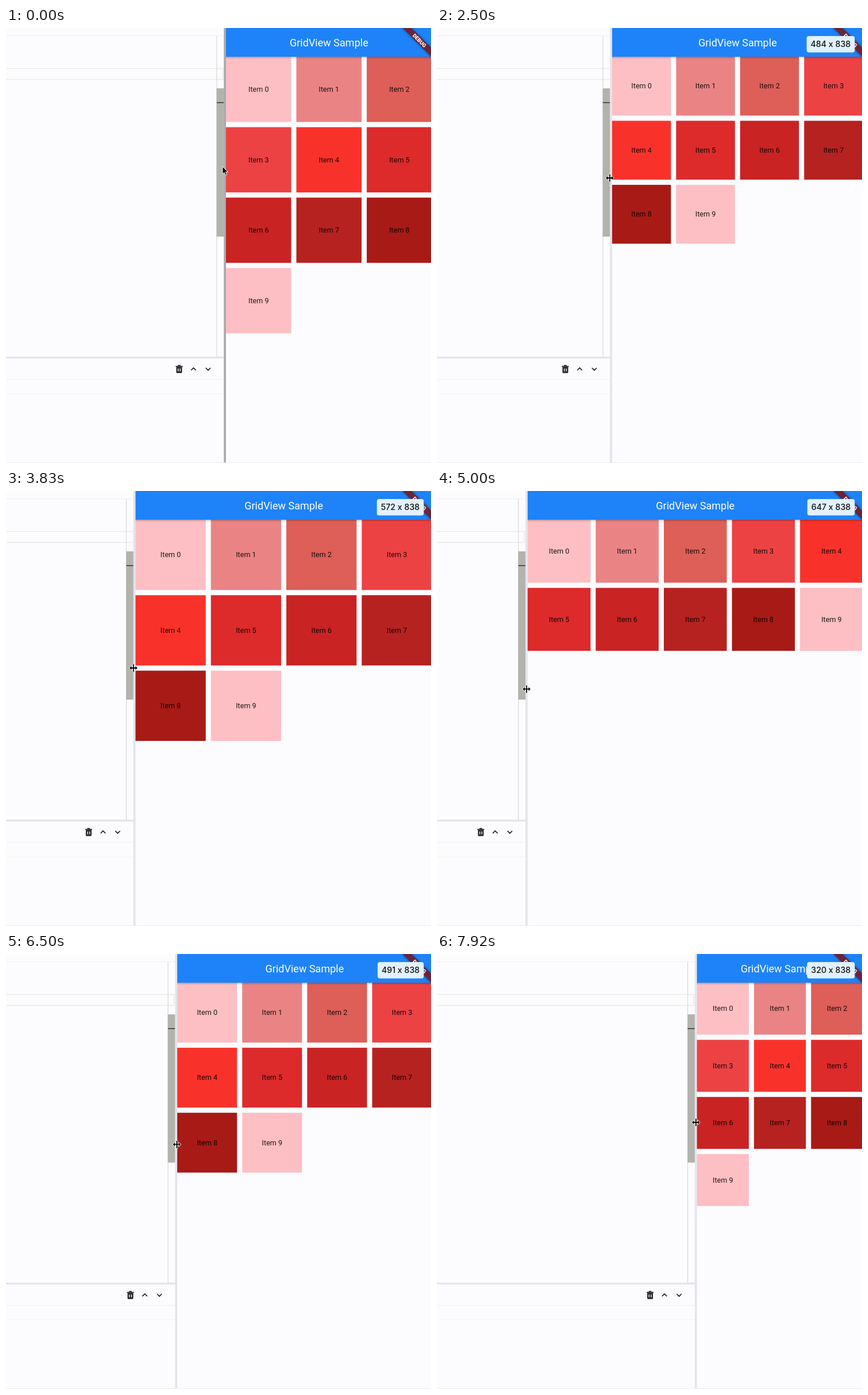
Animation, 740 px wide and 757 px high, one loop 8000 ms. Source, as an HTML page:

```html
<!DOCTYPE html>
<html lang="en">
<head>
<meta charset="utf-8">
<title>Responsive grid</title>
<style>
  html, body { margin: 0; width: 100%; height: 100%; overflow: hidden; background: #fcfcff; }
  svg { display: block; width: 740px; height: 757px; }
  text { font-family: Roboto, sans-serif; text-anchor: middle; }
  .title { font-size: 18.04px; fill: #fff; }
  .item { font-size: 12.63px; fill: #000; fill-opacity: .87; }
  .debug { font-size: 9.2px; font-weight: 900; fill: #fff; }
  .size { font: 500 14.2px Inter, sans-serif; text-anchor: end; fill: #111; }
  .icon { fill: none; stroke: #23272c; stroke-width: 1.7; }
</style>
</head>
<body>
<svg viewBox="0 0 740 757">
  <defs>
    <linearGradient id="shade" x2="0" y2="1">
      <stop stop-color="#000" stop-opacity=".22"/>
      <stop offset="1" stop-color="#000" stop-opacity="0"/>
    </linearGradient>
    <filter id="blur" x="-20%" y="-100%" width="140%" height="300%"><feGaussianBlur stdDeviation="2"/></filter>
  </defs>
  <rect width="740" height="757" fill="#fcfcff"/>
  <rect y="756" width="740" height="1" fill="#ececf1"/>

  <!-- editor side, x = 0 at the panel edge -->
  <g id="editor">
    <path d="M-740 13.5H-4M-740 611.5H-4" stroke="#efeff2"/>
    <path d="M-740 636.5H-4" stroke="#f5f4ea"/>
    <path d="M-740 70.5H-4M-740 89.5H-4" stroke="#e9e9e3" stroke-width="1.4"/>
    <path id="boxEnd" d="M-5.5 70V90" stroke="#e9e9e3" stroke-width="1.4"/>
    <rect x="-740" y="572" width="737" height="3" fill="#e3e3e8"/>
    <path d="M-16 14V572" stroke="#d2d2d4"/>
    <rect x="-16.4" y="105" width="13" height="258" fill="#b3b3ae"/>
    <rect x="-16" y="129" width="12.5" height="1.6" fill="#3c3c3c"/>
    <g transform="translate(-81.5 593.5)">
      <path d="M-6 -5.6H6V-3.8H-6ZM-2.4 -7H2.4V-5H-2.4ZM-5 -3.5H5V5.4Q5 7 3.4 7H-3.4Q-5 7 -5 5.4Z" fill="#23272c"/>
      <path d="M-1.8 -1V4M1.8 -1V4" stroke="#fcfcff" stroke-width="1.4"/>
    </g>
    <path class="icon" d="M-60.7 595.7L-56.5 591.5L-52.3 595.7M-35.2 591.5L-31 595.7L-26.8 591.5"/>
    <rect id="divider" x="-3.7" width="3.7" height="756"/>
  </g>

  <g id="panel">
    <g id="tiles"></g>
    <rect y="50" width="740" height="4" fill="url(#shade)"/>
    <rect width="740" height="50" fill="#1e83f8"/>
    <text id="title" class="title" y="31.5">GridView Sample</text>
  </g>

  <g transform="translate(741.7 0) rotate(45)">
    <rect x="-36" y="25.3" width="72" height="10.8" fill="#000" opacity=".5" filter="url(#blur)"/>
    <rect x="-40" y="25.3" width="80" height="10.8" fill="#6b2438"/>
    <text class="debug" y="34">DEBUG</text>
  </g>

  <g id="badge">
    <rect id="badgeBox" y="14" height="28.5" rx="4" fill="#e1f1fe"/>
    <text id="badgeText" class="size" x="720.3" y="33.2"></text>
  </g>

  <path id="arrow" d="M0 0V13.4L3.1 10.5L5.2 15.2L7.5 14.2L5.4 9.6H9.6Z" fill="#000" stroke="#fff" stroke-width="1"/>
  <g id="resize" stroke-linejoin="round">
    <path id="resizeShape" d="M-.9 -6.5H.9V-.9H3.4V-3.4L6.8 0L3.4 3.4V.9H.9V6.5H-.9V.9H-3.4V3.4L-6.8 0L-3.4 -3.4V-.9H-.9Z"
      fill="#000" stroke="#fff" stroke-width="1.6" paint-order="stroke"/>
  </g>
</svg>
<script>
const LOOP = 8000, STEP = 1000 / 12;
const RIGHT = 741.7, SCALE = 0.902, GAP = 10, MAX_TILE = 150, BAR = 50;
const REDS = ['#fdbfc3', '#ea8484', '#de5e58', '#ec4244', '#f8322b',
              '#dd2a2b', '#c92324', '#b62220', '#a81a15'];

// [time, value] pairs, joined linearly
const EDGE = [[1167, 383], [1500, 363.5], [2000, 335], [2500, 304.9], [2833, 289],
  [3667, 236], [3833, 225.5], [4500, 155], [4583, 154], [4917, 154], [5750, 192],
  [6000, 214.6], [6583, 312], [6917, 350.8], [7417, 385], [7917, 452.6]];
const CURSOR_DX = [[0, -6], [750, -2], [1167, -4], [1500, -4.5], [3833, -3.5], [6000, -.3], [7917, -1.7]];
const CURSOR_Y = [[1500, 241], [2500, 261], [3833, 308], [4583, 340], [6000, 356], [6917, 311], [7917, 293]];

const $ = id => document.getElementById(id);
const move = (el, x, y = 0) => el.setAttribute('transform', `translate(${x} ${y})`);
const show = (el, on) => el.setAttribute('visibility', on ? 'visible' : 'hidden');
const make = (name, attrs, parent) => {
  const el = document.createElementNS('http://www.w3.org/2000/svg', name);
  for (const key in attrs) el.setAttribute(key, attrs[key]);
  return parent.appendChild(el);
};

function at(keys, t) {
  const i = keys.findIndex(k => k[0] > t);
  if (i === 0) return keys[0][1];
  if (i < 0) return keys[keys.length - 1][1];
  const [t0, a] = keys[i - 1], [t1, b] = keys[i];
  return a + (b - a) * (t - t0) / (t1 - t0);
}

const tiles = Array.from({ length: 10 }, (_, i) => {
  const g = make('g', {}, $('tiles'));
  const rect = make('rect', { fill: REDS[i % REDS.length] }, g);
  const label = make('text', { class: 'item' }, g);
  label.textContent = 'Item ' + i;
  return { g, rect, label };
});

function layoutGrid(width) {
  const cols = Math.ceil(width / (MAX_TILE + GAP));
  const pitch = (width + GAP) / cols * SCALE;
  const size = pitch - GAP * SCALE;
  tiles.forEach(({ g, rect, label }, i) => {
    move(g, i % cols * pitch, BAR + Math.floor(i / cols) * pitch);
    rect.setAttribute('width', size);
    rect.setAttribute('height', size);
    label.setAttribute('x', size / 2);
    label.setAttribute('y', size / 2 + 4.2);
  });
}

function draw(t) {
  const edge = at(EDGE, t), width = (RIGHT - edge) / SCALE;
  const resized = t > 1200, hovering = t > 700;
  move($('editor'), edge);
  move($('panel'), edge);
  layoutGrid(width);
  $('title').setAttribute('x', width * SCALE / 2);

  show($('boxEnd'), !resized || t > 4600);
  const fade = Math.min(1, t / 1083);
  const grey = Math.round(170 + 58 * fade);
  $('divider').setAttribute('fill', `rgb(${grey},${grey},${grey + Math.round(6 * fade)})`);

  show($('badge'), resized);
  $('badgeText').textContent = Math.floor(width) + ' x 838';
  const badgeWidth = $('badgeText').getComputedTextLength() + 14;
  $('badgeBox').setAttribute('x', 727.4 - badgeWidth);
  $('badgeBox').setAttribute('width', badgeWidth);

  const cx = edge + at(CURSOR_DX, t), cy = at(CURSOR_Y, t);
  show($('arrow'), !hovering);
  show($('resize'), hovering);
  move($('arrow'), cx, cy);
  move($('resize'), cx, cy);
}

const start = performance.now();
function tick() {
  const t = (performance.now() - start) % LOOP;
  draw(Math.min(95, Math.floor((t + 6.7) / STEP)) * STEP);
  requestAnimationFrame(tick);
}
tick();
</script>
</body>
</html>
```
